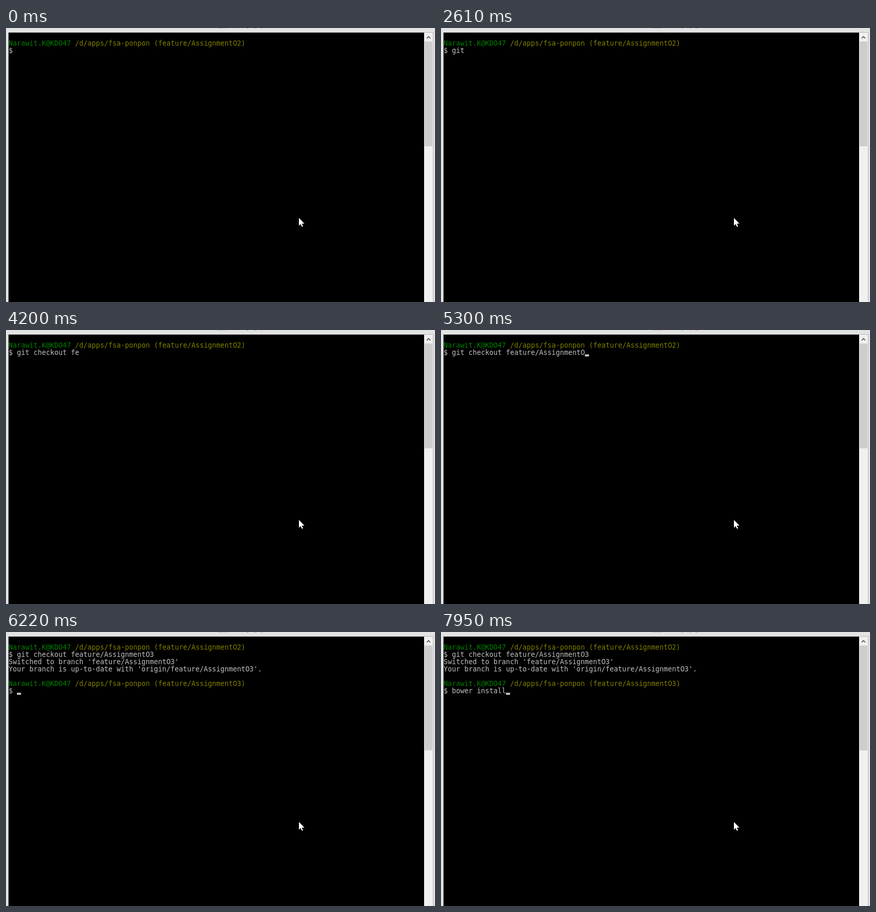
Write an HTML page with a canvas that moves like this. It is 826x528 px and loops after 8 s.

```html
<!DOCTYPE html>
<html lang="en">
<head>
<meta charset="utf-8">
<title>Terminal session</title>
<style>
  html, body { margin: 0; width: 100%; height: 100%; overflow: hidden; background: #e3e3e3; }
  canvas { display: block; }
</style>
</head>
<body>
<canvas id="stage" width="826" height="528"></canvas>
<script>
const ctx = document.getElementById('stage').getContext('2d', { alpha: false });
const LOOP = 8000;
const CELL = 8, LINE = 14, LEFT = 5, TOP = 9, ASCENT = 11;
const MONO = '13.29px "DejaVu Sans Mono", monospace';
const SANS = '13.29px "DejaVu Sans", sans-serif';
const GREEN = '#008000', OLIVE = '#808000', GREY = '#c0c0c0';

const USER = 'Narawit.K@KD047';
const CHECKOUT = 'git checkout feature/Assignment03';

// Each state: start time, phase, typed text, cursor visible
const STATES = [
  [0, 0, '', 0], [570, 0, '', 1], [1110, 0, '', 0], [1660, 0, '', 1], [2190, 0, '', 0],
  [2310, 0, 'gi', 1], [2460, 0, 'git ', 1], [2610, 0, 'git ', 0],
  [3170, 0, 'git ch', 1], [3320, 0, 'git chec', 1], [3440, 0, 'git check', 1],
  [3690, 0, 'git checko', 1], [3820, 0, 'git checkout', 1], [3960, 0, 'git checkout ', 1],
  [4080, 0, 'git checkout f', 1], [4200, 0, 'git checkout fe', 0], [4350, 0, 'git checkout fea', 1],
  [4620, 0, CHECKOUT.slice(0, -1), 1], [4740, 0, CHECKOUT.slice(0, -1), 0],
  [5300, 0, CHECKOUT.slice(0, -1), 1], [5830, 0, CHECKOUT.slice(0, -1), 0], [5950, 0, CHECKOUT, 1],
  [6100, 1, '', 1],
  [6220, 2, '', 1], [6340, 2, '', 0], [6780, 2, '', 1],
  [6900, 2, 'b', 1], [7020, 2, 'bo', 1], [7170, 2, 'bow', 1], [7300, 2, 'bower', 1],
  [7420, 2, 'bower i', 1], [7560, 2, 'bower in', 1], [7680, 2, 'bower inst', 1],
  [7830, 2, 'bower insta', 1], [7950, 2, 'bower install', 1]
];

function rect(color, x, y, w, h) {
  ctx.fillStyle = color;
  ctx.fillRect(x, y, w, h);
}

function print(text, col, row, color) {
  const x = LEFT + col * CELL, y = TOP + row * LINE + ASCENT;
  ctx.fillStyle = color;
  ctx.font = MONO;
  ctx.textAlign = 'left';
  ctx.fillText(text.replace(/0/g, ' '), x, y);
  // Zeros are plain, without a dot inside
  ctx.font = SANS;
  ctx.textAlign = 'center';
  [...text].forEach((ch, i) => {
    if (ch === '0') ctx.fillText(ch, x + (i + 0.5) * CELL, y);
  });
}

function prompt(row, branch, typed) {
  print(USER, 0, row, GREEN);
  print(`/d/apps/fsa-ponpon (${branch})`, USER.length + 1, row, OLIVE);
  print('$ ' + typed, 0, row + 1, GREY);
}

function caret(col, row) {
  rect(GREY, LEFT + col * CELL, TOP + (row + 1) * LINE - 4, CELL, 4);
}

function drawWindow() {
  rect('#e3e3e3', 0, 0, 826, 528);
  // Descenders of the cropped title
  for (const x of [410, 464]) rect('#5b8fc9', x, 0, 2, 1);
  for (const x of [416, 422, 479, 491]) rect('#d08a4a', x, 0, 2, 1);
  rect('#b4b4b4', 4, 8, 819, 520);
  rect('#000', 5, 9, 800, 519);
  rect('#f0f0f0', 805, 9, 17, 519);
  rect('#cdcdcd', 806, 26, 15, 202);
  ctx.strokeStyle = '#505050';
  ctx.lineWidth = 1.6;
  ctx.beginPath();
  ctx.moveTo(810, 20);
  ctx.lineTo(813.5, 16.5);
  ctx.lineTo(817, 20);
  ctx.stroke();
}

function drawPointer() {
  ctx.fillStyle = '#fff';
  ctx.beginPath();
  [[564, 366], [564, 381], [567.3, 377.8], [569.8, 383], [572, 382.2], [569.6, 377], [574.5, 377]]
    .forEach(([x, y]) => ctx.lineTo(x, y));
  ctx.fill();
}

function draw(t) {
  const [, phase, typed, on] = STATES.findLast(s => s[0] <= t);
  drawWindow();
  prompt(1, 'feature/Assignment02', phase ? CHECKOUT : typed);
  if (phase === 2) {
    print("Switched to branch 'feature/Assignment03'", 0, 3, GREY);
    print("Your branch is up-to-date with 'origin/feature/Assignment03'.", 0, 4, GREY);
    prompt(6, 'feature/Assignment03', typed);
  }
  if (on) caret(phase === 1 ? 0 : typed.length + 2, [2, 3, 7][phase]);
  drawPointer();
}

const start = performance.now();
function tick() {
  draw((performance.now() - start) % LOOP);
  requestAnimationFrame(tick);
}
tick();
</script>
</body>
</html>
```
